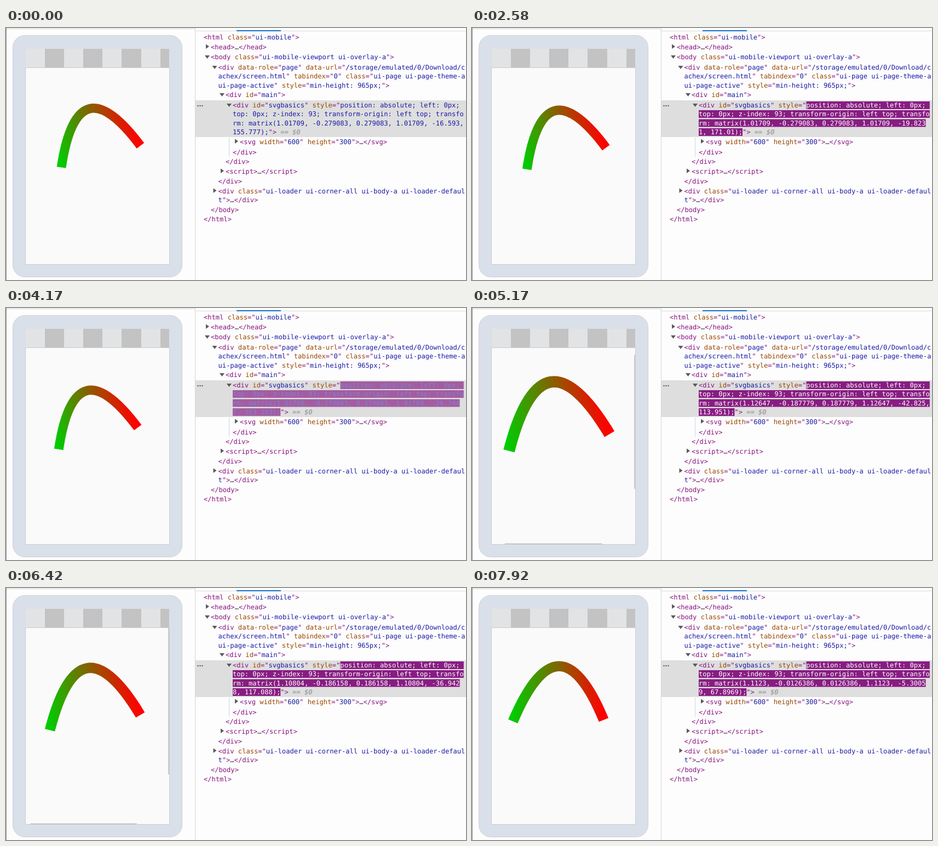
Animation, 840 px wide and 460 px high, one loop 8 s. Source, as an HTML page:

```html
<!DOCTYPE html>
<html lang="en">
<head>
<meta charset="utf-8">
<title>Gesture on an SVG element</title>
<style>
  html, body { margin: 0; width: 100%; height: 100%; overflow: hidden; background: #fdfdfd; }
  svg { display: block; }
  text { font: 12.08px "DejaVu Sans Mono", monospace; white-space: pre; text-rendering: geometricPrecision; }
</style>
</head>
<body>
<svg id="stage" width="840" height="460" viewBox="0 0 840 460">
  <defs>
    <linearGradient id="ink">
      <stop offset="0" stop-color="#00cc00"/>
      <stop offset="1" stop-color="#ff0000"/>
    </linearGradient>
    <clipPath id="screen"><rect x="36" y="73" width="262" height="358"/></clipPath>
  </defs>
  <rect width="840" height="460" fill="#fdfdfd"/>
  <path d="M0 1.5H345M345.5 0V460" stroke="#d4d4d4"/>
  <path d="M.5 0V460" stroke="#8c8c8c"/>
  <path d="M346 5.5H840" stroke="#dedede"/>
  <path d="M421 5H502" stroke="#1a73c8" stroke-width="2"/>
  <rect x="12.5" y="13.5" width="309" height="441" rx="22" fill="#dae0ea" stroke="#cdd0d4"/>
  <rect x="36" y="38" width="262" height="35" fill="#e2e3e4"/>
  <path d="M71 38h35v35h-35zM141 38h35v35h-35zM211 38h36v35h-36zM282 38h16v35h-16z" fill="#c3c3c3"/>
  <rect x="35.5" y="72.5" width="263" height="359" fill="#fafafa" stroke="#cbcdd0"/>
  <g clip-path="url(#screen)">
    <path id="arc" d="M84 249.5q160 -362 302 0" fill="none" stroke="url(#ink)" stroke-width="34"/>
    <path id="bars" stroke="#bcbcbc" stroke-width="1.5"/>
  </g>
  <rect x="346" y="132" width="494" height="67" fill="#dedede"/>
  <path d="M407.5 200V235" stroke="#c9d7e6"/>
  <g id="tree"></g>
  <g id="live"></g>
</svg>
<script>
const CW = 7.273, LEFT = 414, COLS = 58;
const TAG = '#881280', ATTR = '#994500', VALUE = '#1a1aa6', PLAIN = '#303030', ICON = '#5a5a5a';
const $ = id => document.getElementById(id);

function add(parent, name, attrs, content) {
  const el = document.createElementNS('http://www.w3.org/2000/svg', name);
  for (const k in attrs) el.setAttribute(k, attrs[k]);
  if (content) el.textContent = content;
  parent.appendChild(el);
  return el;
}

// x, arrow, centre of each row, markup with its line wraps
const nodes = [
  [361, '', [17], '<html class="ui-mobile">'],
  [374, '>', [35], '<head>…</head>'],
  [374, 'v', [53], '<body class="ui-mobile-viewport ui-overlay-a">'],
  [387.5, 'v', [72, 88, 105], '<div data-role="page" data-url="/storage/emulated/0/Download/c\nachex/screen.html" tabindex="0" class="ui-page ui-page-theme-a\nui-page-active" style="min-height: 965px;">'],
  [401, 'v', [122], '<div id="main">'],
  [LEFT, 'v', [141], '<div id="svgbasics" style="'],
  [427, '>', [208], '<svg width="600" height="300">…</svg>'],
  [LEFT, '', [227], '</div>'],
  [401, '', [244], '</div>'],
  [401, '>', [262], '<script>…<\/script>'],
  [387.5, '', [280], '</div>'],
  [387.5, '>', [298, 314], '<div class="ui-loader ui-corner-all ui-body-a ui-loader-defaul\nt">…</div>'],
  [374, '', [332], '</body>'],
  [361, '', [349], '</html>']
];

function drawNode([x, arrow, rows, markup]) {
  const tree = $('tree'), y = rows[0];
  if (arrow === 'v') add(tree, 'path', { d: `M${x - 11} ${y - 3}h9l-4.5 6z`, fill: ICON });
  if (arrow === '>') add(tree, 'path', { d: `M${x - 9} ${y - 5.5}v8.5l6-4.2z`, fill: ICON });
  let inTag = false, inValue = false, inAttr = false;
  markup.split('\n').forEach((line, i) => {
    const text = add(tree, 'text', { x, y: rows[i] + 4 });
    let run = null, last = '';
    for (const ch of line) {
      if (ch === '<') { inTag = true; inAttr = false; }
      if (ch === ' ' && !inValue) inAttr = true;
      if (ch === '=' || ch === '>') inAttr = false;
      const fill = ch === '"' ? TAG : inValue ? VALUE : inAttr ? ATTR : inTag ? TAG : PLAIN;
      if (ch === '"') inValue = !inValue;
      if (ch === '>') inTag = false;
      if (fill !== last) run = add(text, 'tspan', { fill });
      run.textContent += ch;
      last = fill;
    }
  });
}
nodes.forEach(drawNode);
for (const cx of [350.5, 354.5, 358.5]) add($('tree'), 'circle', { cx, cy: 142, r: 1.2, fill: ICON });

// the four rows of the style value
const rows = [[LEFT + 27 * CW, 141], [LEFT, 157], [LEFT, 173.5], [LEFT, 190]].map(([x, y]) => ({
  box: add($('live'), 'rect', { x, y: y - 7, height: 14 }),
  text: add($('live'), 'text', { x, y: y + 4 })
}));
const tail = add($('live'), 'text', { y: 194 });
add(tail, 'tspan', { fill: TAG }, '">');
add(tail, 'tspan', { fill: '#8a8a8a', 'font-style': 'italic' }, ' == $0');

// Each key holds from step `at` to `until` and inherits what it does not set.
// a b e f: element matrix; zoom sx sy: pinch zoom and scroll of the page.
const STEP = 1000 / 12, STEPS = 96, GRAB = 31;
const keys = [
  { at: 0, until: GRAB - 1, a: 1.01709, b: 0.279083, e: -16.593, f: 155.777, zoom: 1, sx: 0, sy: 0 },
  { at: GRAB, e: -19.8231, f: 171.01 },
  { at: 39, e: -70.2148, f: 212.386 },
  { at: 44, until: 50, e: -26.7447, f: 163.163 },
  { at: 62, a: 1.12647, b: 0.187779, e: -42.825, f: 113.951, zoom: 1.15, sx: 22, sy: 17 },
  { at: 64, until: 71, a: 1.12828, b: 0.18355, e: -42.5514, f: 112.313, zoom: 1.17, sx: 25, sy: 18.5 },
  { at: 76, until: 89, a: 1.10804, b: 0.186158, e: -36.9428, f: 117.088, zoom: 1.05, sx: 6.5, sy: 0 },
  { at: 95, a: 1.1123, b: 0.0126386, e: -5.30059, f: 67.8969 }
];
keys.forEach((key, i) => { keys[i] = { ...keys[i - 1], until: key.at, ...key }; });

const ease = k => (1 - Math.cos(Math.PI * k)) / 2;

function blend(p, q, k) {
  const out = {};
  for (const name in p) out[name] = p[name] + (q[name] - p[name]) * k;
  return out;
}

function stateAt(n) {
  const i = keys.findLastIndex(key => key.at <= n), key = keys[i];
  if (n <= key.until) return { ...key, idle: n - key.at };
  const next = keys[i + 1];
  return { ...blend(key, next, ease((n - key.until) / (next.at - key.until))), idle: 0 };
}

const mix = (p, q, k) => `rgb(${p.map((v, i) => Math.round(v + (q[i] - v) * k))})`;
const num = v => String(Number(v.toPrecision(6)));

function wrapMatrix({ a, b, e, f }) {
  const s = `rm: matrix(${[a, -b, b, a, e, f].map(num).join(', ')});`;
  const cut = s[COLS] === ',' ? COLS - 1 : COLS;
  return [s.slice(0, cut), s.slice(cut).trimStart()];
}

function drawPage({ a, b, e, f, zoom, sx, sy }, scrolling) {
  $('arc').setAttribute('transform',
    `translate(${36 - sx} ${73 - sy}) scale(${0.47 * zoom}) matrix(${a} ${-b} ${b} ${a} ${e} ${f})`);
  $('bars').setAttribute('d', scrolling
    ? `M297 ${73 + sy * 0.75}v${281 / zoom}M${38 + sx} 430.5h${204 / zoom}` : '');
}

function drawStyle(state, touched) {
  const glow = touched ? Math.min(1, 1 - (state.idle - 3) * 0.11) : 0;
  const level = Math.max(0, glow);
  const back = mix([222, 222, 222], [136, 28, 130], level);
  const ink = mix([26, 26, 166], [255, 255, 255], level * level);
  const lines = ['position: absolute; left: 0px; ',
    'top: 0px; z-index: 93; transform-origin: left top; transfo', ...wrapMatrix(state)];
  rows.forEach(({ box, text }, i) => {
    box.setAttribute('width', lines[i].length * CW);
    box.setAttribute('fill', back);
    text.setAttribute('fill', ink);
    text.textContent = lines[i];
  });
  tail.setAttribute('x', LEFT + lines[3].length * CW);
}

function draw(n) {
  const state = stateAt(n);
  // the phone repaints half a step behind the inspector
  drawPage(blend(stateAt(Math.max(0, n - 1)), state, 0.5), n > 50 && n < 91);
  drawStyle(state, n >= GRAB);
}

let shown = -1;
function tick() {
  const n = Math.floor((performance.now() + 4) / STEP) % STEPS;
  if (n !== shown) draw(shown = n);
  requestAnimationFrame(tick);
}
tick();
</script>
</body>
</html>
```
